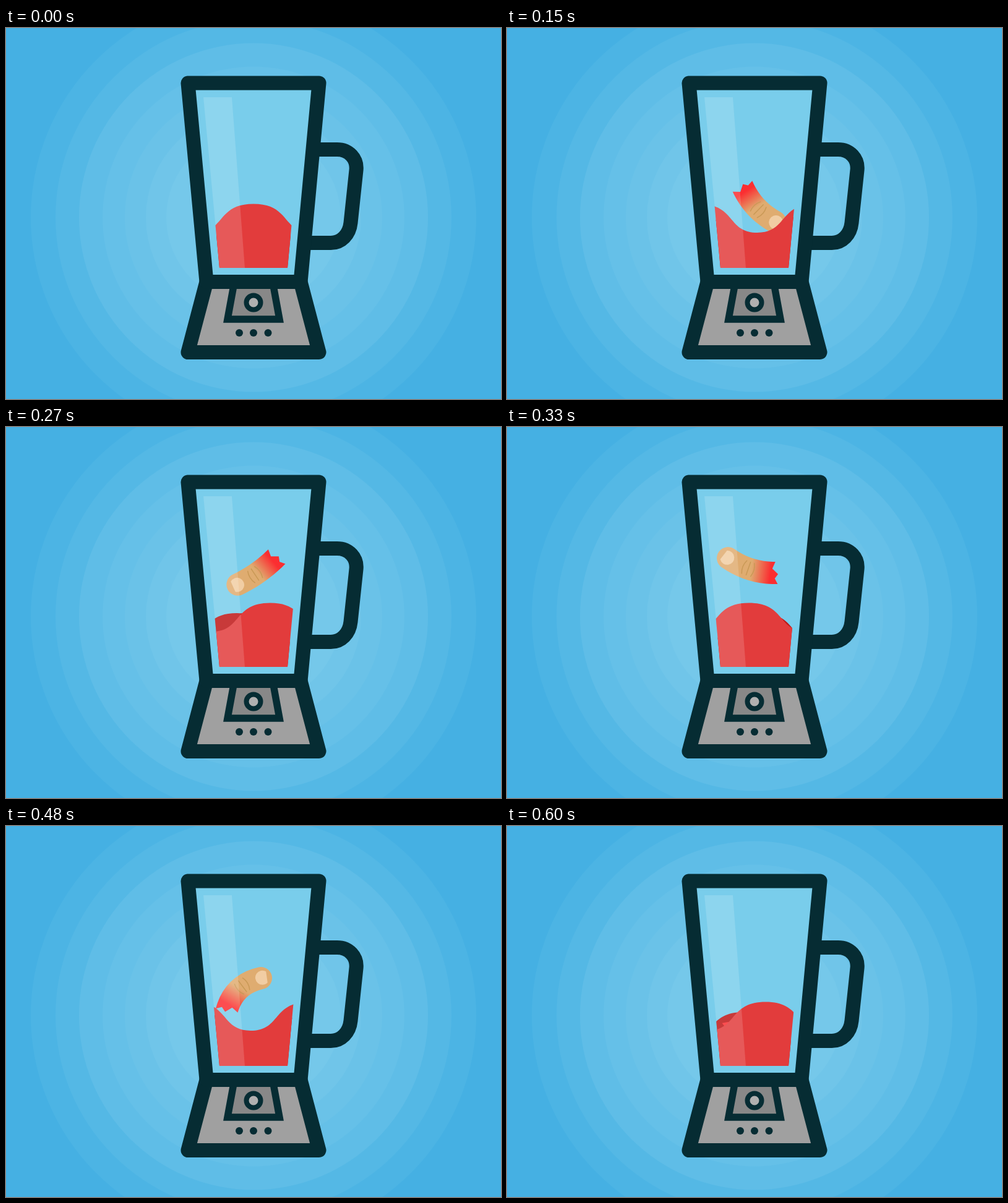
An HTML page that plays this animation: 800x600 px, repeating every 0.63 s.

```html
<!DOCTYPE html>
<html lang="en">
<head>
<meta charset="utf-8">
<title>Blender</title>
<style>
html, body { margin: 0; width: 100%; height: 100%; overflow: hidden; background: #45b0e3; }
svg { display: block; width: 100vw; height: 100vh; }
</style>
</head>
<body>
<svg viewBox="0 0 800 600">
  <defs>
    <clipPath id="liquid"><path d="M319 112H481L455 388H345Z"/></clipPath>
    <linearGradient id="skin" gradientUnits="userSpaceOnUse">
      <stop offset=".28" stop-color="#fb2e31"/>
      <stop offset="1" stop-color="#dfac70"/>
    </linearGradient>
  </defs>
  <rect width="800" height="600" fill="#45b0e3"/>
  <g id="rings"></g>
  <path d="M294 89H506L476 410.5H324Z" fill="#79cdeb"/>
  <g clip-path="url(#liquid)"><path id="back" fill="#be1818"/></g>
  <path id="body" fill="url(#skin)"/>
  <path id="nail" fill="#f1cda3"/>
  <path id="knuckle" fill="none" stroke="#c99956" stroke-width="1.5" stroke-linecap="round"/>
  <g clip-path="url(#liquid)"><path id="front" fill="#e23c3c"/></g>
  <path d="M319 112H365L386 388H345Z" fill="#fff" fill-opacity=".15"/>
  <g fill="none" stroke="#062c33" stroke-width="23" stroke-linejoin="round">
    <path d="M498 196.5H535C554 196.5 568 211 566 230L557 315C555 334 542 347.5 525 347.5H484"/>
    <path d="M324 410.5H476L506 524.5H294Z" fill="#a0a0a0"/>
    <path d="M369 411L358 471H442L431 411" fill="#888" stroke-width="11.5" stroke-linejoin="miter"/>
    <path d="M294 89H506L476 410.5H324Z"/>
    <circle cx="400" cy="444" r="11.5" fill="#b0b0b0" stroke-width="8"/>
  </g>
  <g fill="#062c33">
    <circle cx="377" cy="493" r="6"/>
    <circle cx="400" cy="493" r="6"/>
    <circle cx="423.5" cy="493" r="6"/>
  </g>
</svg>
<script>
const LOOP = 630, STEP = 30, WAVE = 189, HALF = WAVE / 2;
const $ = id => document.getElementById(id);
const set = (id, d) => $(id).setAttribute('d', d);
const fmt = ([x, y]) => x.toFixed(2) + ' ' + y.toFixed(2);

const rings = [[360, '#4cb4e4'], [320, '#54b8e5'], [282, '#5fbde7'], [244, '#65c0e8'],
  [208, '#6ac2e8'], [174, '#70c5e9'], [141, '#75c8ea']];
$('rings').innerHTML = rings.map(([r, c]) =>
  `<circle cx="400" cy="306.5" r="${r}" fill="${c}"/>`).join('');

// Crests are broader than troughs
function wave(crest, top) {
  const low = top + 46.5;
  let x = crest % WAVE, d = `M${x} ${top}`;
  for (; x < 520; x += WAVE) {
    const mid = x + HALF, end = x + WAVE;
    d += `C${x + 60} ${top} ${mid - 49} ${low} ${mid} ${low}` +
         `C${mid + 49} ${low} ${end - 60} ${top} ${end} ${top}`;
  }
  return d + 'V400H0V400Z';
}

// time, centre x, centre y, heading, length, bend
const keys = [
  [0, 398, 350, 18, 78, 0],
  [150, 406.5, 283.5, 48, 81, -7],
  [210, 413, 248, 93, 76, -1],
  [330, 397.5, 224, 196.5, 84.5, 7],
  [420, 379.5, 243.5, 273.5, 81, 9],
  [480, 384, 273.5, 315.5, 78.5, 12],
  [600, 390, 340, 365, 80, 6]
];
const turns = [LOOP, 0, 0, 360, 0, 0];

function key(i) {
  const n = keys.length, lap = Math.floor(i / n);
  return keys[i - lap * n].map((v, j) => v + lap * turns[j]);
}

function pose(t) {
  let i = 0;
  while (key(i + 1)[0] <= t) i++;
  const [a, b, c, d] = [-1, 0, 1, 2].map(k => key(i + k));
  const h = c[0] - b[0], s = (t - b[0]) / h, q = s * s, r = q * s;
  return b.map((v, j) => {
    const m = (c[j] - a[j]) / (c[0] - a[0]) * h;
    const n = (d[j] - v) / (d[0] - b[0]) * h;
    return (2 * r - 3 * q + 1) * v + (r - 2 * q + s) * m + (3 * q - 2 * r) * c[j] + (r - q) * n;
  });
}

function finger(t) {
  const [, cx, cy, deg, len, bend] = pose(t);
  const a = deg * Math.PI / 180, ux = Math.cos(a), uy = Math.sin(a);

  // Point at distance d from the stump and w across the bent axis
  function at(d, w) {
    const s = d / len, along = d - len / 2;
    const off = -4 * bend * s * (1 - s);
    const slope = -4 * bend * (1 - 2 * s) / len, k = Math.hypot(1, slope);
    const p = along - w * slope / k, o = off + w / k;
    return [cx + p * ux - o * uy, cy + p * uy + o * ux];
  }
  const pt = (d, w) => fmt(at(d, w));

  const jag = [[1, -18], [5, -9], [0, -2], [9, 7], [4, 18]];
  const sides = [[], []];
  for (let i = 1; i <= 10; i++) {
    sides[0].push(pt(len * i / 10, 18));
    sides[1].unshift(pt(len * i / 10, -18));
  }
  set('body', 'M' + jag.map(p => pt(...p)).join('L') + 'L' + sides[0].join('L') +
    'A18 18 0 0 0 ' + sides[1].join('L') + 'Z');

  set('nail', `M${pt(len + 8, 9)}A11.5 11.5 0 1 1 ${pt(len + 8, -9)}Z`);

  set('knuckle', [-7, 0, 7].map(k => {
    const d = 48 + k;
    return `M${pt(d, 11)}Q${pt(d + k * .7, 0)} ${pt(d, -11)}`;
  }).join(''));

  const [x1, y1] = at(0, 0), [x2, y2] = at(43, 0), g = $('skin');
  Object.entries({ x1, y1, x2, y2 }).forEach(([n, v]) => g.setAttribute(n, v));
}

function draw(t) {
  const shift = WAVE * 2 * t / LOOP;
  set('front', wave(400 + 2 * WAVE - shift, 284.5));
  set('back', wave(400 + shift, 301));
  finger(t);
}

const start = performance.now();
function tick() {
  const t = (performance.now() - start) % LOOP;
  draw(Math.floor(t / STEP) * STEP);
  requestAnimationFrame(tick);
}
draw(0);
requestAnimationFrame(tick);
</script>
</body>
</html>
```
